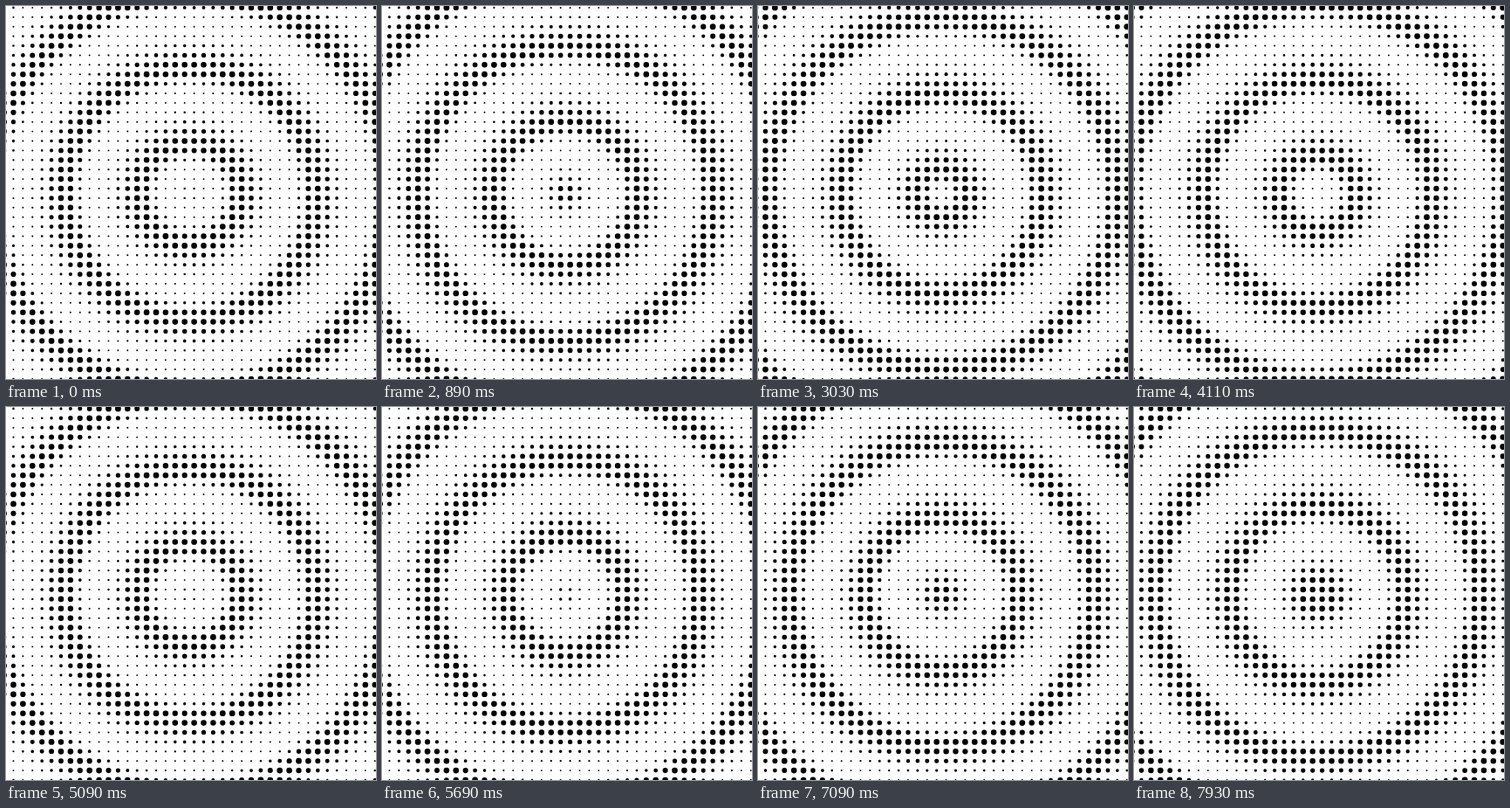
Write an HTML page with a canvas that moves like this. It is 424 px wide and 427 px high and loops after 8000 ms.

```html
<!DOCTYPE html>
<html lang="en">
<head>
<meta charset="utf-8">
<title>Halftone ripples</title>
<style>
  html, body { margin: 0; width: 100%; height: 100%; overflow: hidden; background: #fff; }
  canvas { display: block; }
</style>
</head>
<body>
<canvas id="stage" width="424" height="427"></canvas>
<script>
  const ctx = document.getElementById('stage').getContext('2d');
  const LOOP = 8000;
  const GAP = 10.9, COUNT = 40, LEFT = -2.4, TOP = 1.9;
  const CX = 210.6, CY = 214.6;
  const WAVE = 86, FALL = 32, RISE = WAVE - FALL;
  const START = 56.4, CYCLE = 126;
  const MIN_R = 0.95, MAX_R = 3.4;

  const dots = [];
  for (let j = 0; j < COUNT; j++) {
    for (let i = 0; i < COUNT; i++) {
      const x = LEFT + i * GAP, y = TOP + j * GAP;
      dots.push({ x, y, dist: Math.hypot(x - CX, y - CY) });
    }
  }

  // Three steps per 140 ms, held for 20, 20 and 100 ms
  function steps(ms) {
    const rest = ms % 140;
    return 3 * Math.floor(ms / 140) + (rest >= 20) + (rest >= 40);
  }

  // Two longer holds with bigger jumps interrupt the regular rhythm
  function stepAt(t) {
    if (t < 450) return Math.min(7, steps(t));
    if (t < 630) return 19;
    return 30 + steps(t - 610);
  }

  // Steeper on the inner side of each ring than on the outer side
  function radius(dist, front) {
    const u = (((dist - front + FALL) % WAVE) + WAVE) % WAVE - FALL;
    const s = (1 + Math.cos(Math.PI * u / (u < 0 ? FALL : RISE))) / 2;
    return MIN_R + (MAX_R - MIN_R) * s ** 1.5;
  }

  function draw(t) {
    const front = START + WAVE * stepAt(t) / CYCLE;
    ctx.fillStyle = '#fff';
    ctx.fillRect(0, 0, 424, 427);
    ctx.fillStyle = '#000';
    ctx.beginPath();
    for (const { x, y, dist } of dots) {
      const r = radius(dist, front);
      ctx.moveTo(x + r, y);
      ctx.arc(x, y, r, 0, 2 * Math.PI);
    }
    ctx.fill();
  }

  const begin = performance.now();
  function tick() {
    draw((performance.now() - begin) % LOOP);
    requestAnimationFrame(tick);
  }
  tick();
</script>
</body>
</html>
```
